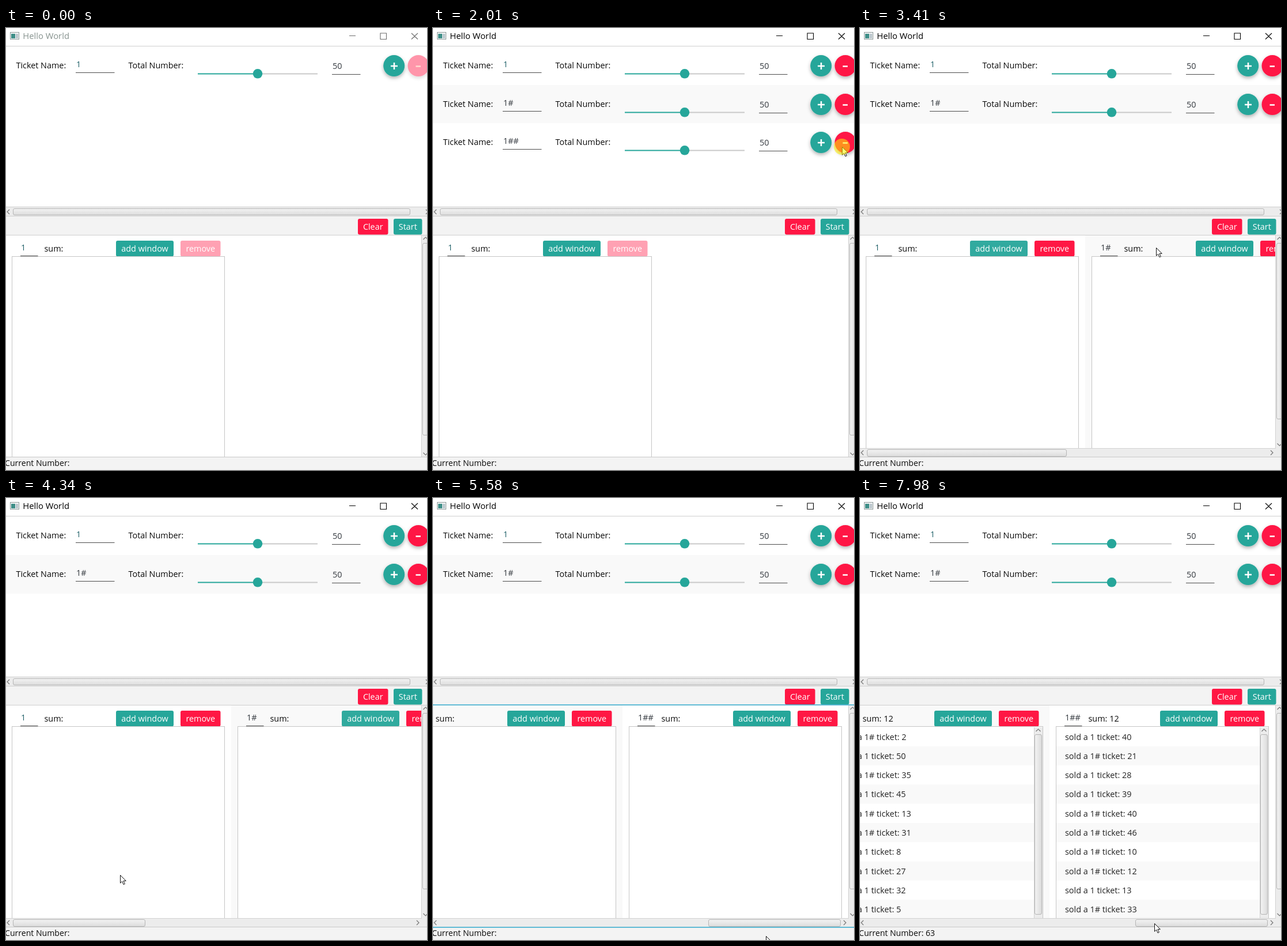
An HTML page for the animation above (8000 ms loop, 731 by 767 pixels).

```html
<!DOCTYPE html>
<html lang="en">
<head>
<meta charset="utf-8">
<title>Ticket windows</title>
<style>
  html, body { margin: 0; width: 100%; height: 100%; overflow: hidden; background: #fff; }
  svg { display: block; font: 14.4px "Open Sans", "Noto Sans", sans-serif; }
</style>
</head>
<body>
<svg id="stage" width="731" height="767" viewBox="0 0 731 767"></svg>
<script>
const LOOP = 8000, STEP = 77.5;
const TEAL = '#26a69a', RED = '#ff1744', INK = '#0a0a0a', FIELD = '#34393f';
const PANEL = 392, MAX_SCROLL = 454, GRAB_X = 99, TRACK = 466;

// Pointer path: time, x, y
const PATH = [
  [70, 567, 314], [300, 640, 50], [450, 668, 62], [1300, 668, 62],
  [1860, 710, 206], [2240, 710, 206], [2900, 228, 398], [3030, 240, 388],
  [3180, 240, 388], [3410, 514, 381], [3720, 631, 387], [4030, 631, 387],
  [4340, 198, 654], [4570, 87, 742], [4720, 99, 740], [5192, 342, 752],
  [5500, 565, 756], [5580, 578, 760], [5960, 578, 760], [6510, 691, 341],
  [6820, 691, 341], [7430, 511, 738], [8000, 511, 738]
];
const PRESSES = [[620, 700], [1160, 1240], [2010, 2080], [3100, 3180],
  [3800, 3950], [4720, 5580], [6660, 6800]];

// Ticket kind and number sold, per window
const SALES = {
  1: ['1# 2', '1 50', '1# 35', '1 45', '1# 13', '1# 31', '1 8', '1 27', '1 32', '1 5'],
  2: ['1 40', '1# 21', '1 28', '1 39', '1# 40', '1# 46', '1# 10', '1# 12', '1 13', '1# 33']
};

const stage = document.getElementById('stage');
const between = (t, a, b) => t >= a && t < b;
const rect = (x, y, w, h, fill, extra = '') =>
  `<rect x="${x}" y="${y}" width="${w}" height="${h}" fill="${fill}" ${extra}/>`;
const path = (d, stroke, width = 1, fill = 'none') =>
  `<path d="${d}" fill="${fill}" stroke="${stroke}" stroke-width="${width}"/>`;
const text = (x, y, s, fill = INK, extra = '') =>
  `<text x="${x}" y="${y}" fill="${fill}" ${extra}>${s}</text>`;
const circle = (x, y, r, fill, extra = '') =>
  `<circle cx="${x}" cy="${y}" r="${r}" fill="${fill}" ${extra}/>`;
const group = (x, y, body) => `<g transform="translate(${x} ${y})">${body}</g>`;
const ticketName = i => '1' + '#'.repeat(i);

const DEFS = `<defs>
  <filter id="shadow" x="-50%" y="-50%" width="200%" height="200%">
    <feDropShadow dx="0" dy="3" stdDeviation="3" flood-opacity=".3"/></filter>
  <linearGradient id="across" x2="1" y2="0"><stop stop-color="#f3f3f3"/><stop offset="1" stop-color="#dcdcdc"/></linearGradient>
  <linearGradient id="down" x2="0" y2="1"><stop stop-color="#f3f3f3"/><stop offset="1" stop-color="#dcdcdc"/></linearGradient>
</defs>`;

function tangent(i, axis) {
  const a = PATH[i - 1], p = PATH[i], b = PATH[i + 1];
  if (!a || !b) return 0;
  const still = q => q[1] === p[1] && q[2] === p[2];
  return still(a) || still(b) ? 0 : (b[axis] - a[axis]) / (b[0] - a[0]);
}

function pointerAt(t) {
  let i = 0;
  while (i < PATH.length - 2 && t >= PATH[i + 1][0]) i++;
  const p = PATH[i], q = PATH[i + 1], span = q[0] - p[0], u = (t - p[0]) / span;
  return [1, 2].map(axis => {
    const ease = u * u * (3 - 2 * u);
    return p[axis] + (q[axis] - p[axis]) * ease
      + span * u * (1 - u) * ((1 - u) * tangent(i, axis) - u * tangent(i + 1, axis));
  });
}

function button(x, y, w, label, fill, opacity = 1) {
  return `<g opacity="${opacity}">` + rect(x, y, w, 27.6, fill, 'rx="3"')
    + text(x + w / 2, y + 19, label, '#fff', 'text-anchor="middle"') + '</g>';
}

function arrow(x, y, angle) {
  return `<path transform="translate(${x} ${y}) rotate(${angle})" d="M-4 2L0 -2L4 2" fill="none" stroke="#777" stroke-width="1.2"/>`;
}

function thumb(x, y, w, h) {
  return rect(x + .5, y + .5, w - 1, h - 1, `url(#${w > h ? 'down' : 'across'})`, 'rx="2.5" stroke="#b5b5b5"');
}

function titleBar(active) {
  const ink = active ? '#000' : '#6c6c6c';
  return rect(0, 0, 731, 31, '#fff')
    + rect(7.5, 7.5, 15, 12, '#f4f4f4', 'stroke="#8c9a9a"')
    + rect(9, 10, 7, 8, '#3f8f88') + rect(17, 10, 4, 8, '#b9c6cc')
    + text(29.3, 19.3, 'Hello World', active ? '#000' : '#87938f', 'font-size="14.8"')
    + path('M596 13.5H607M650 9H660.5V19.5H650ZM704 9L715 19.5M715 9L704 19.5', ink, 1.1)
    + path('M0 31.5H731', '#cfcfcf');
}

function ticketRow(i, removable) {
  const body = rect(0, 0, 731, 67, i % 2 ? '#f9f9f9' : '#fff')
    + text(17.5, 38, 'Ticket Name:') + text(212.5, 38, 'Total Number:')
    + text(122, 35.5, ticketName(i), i ? FIELD : '#1f6068')
    + path('M121 45.5H188.5M566 48.5H615.5', '#4c4c4c')
    + text(567, 39, '50', FIELD)
    + path('M437 47.5H541', '#c9c9c9', 2) + path('M333 47.5H437', TEAL, 2)
    + circle(437, 47.3, 8.3, TEAL)
    + circle(673.7, 33.6, 18.5, TEAL, 'filter="url(#shadow)"')
    + path('M668 34H680M674 28V40', '#fff', 2.5)
    + `<g opacity="${removable ? 1 : .45}">` + circle(716, 33.6, 18.5, RED, 'filter="url(#shadow)"')
    + path('M711.5 34.5H720', removable ? '#fff' : '#ffb199', 2.5) + '</g>';
  return group(0, 32 + Math.round(i * 66.5), body);
}

function toolbar(startGlow) {
  return rect(0, 310, 731, 17, '#ececec') + path('M0 310.5H731M0 326.5H731', '#cfcfcf')
    + arrow(4, 319, -90) + arrow(731, 319, 90) + thumb(12, 313, 690, 12)
    + rect(0, 327, 731, 33, '#f3f3f3') + path('M0 359.5H731', '#cfcfcf')
    + button(611, 331, 52.5, 'Clear', RED) + button(673, 331, 49.5, 'Start', TEAL, 1 - .2 * startGlow);
}

function soldRows(i, sold) {
  let out = '';
  (SALES[i] || []).slice(0, sold).forEach((sale, n) => {
    const [kind, number] = sale.split(' '), y = 397.5 + n * 33.3;
    out += rect(11, y, 368, 33.3, n % 2 ? '#f9f9f9' : '#fff')
      + text(26, y + 22, `sold a ${kind} ticket: ${number}`, '#222');
  });
  if (sold >= 12) {
    out += rect(364, 398, 15, 380, '#ececec') + path('M364.5 398V780', '#d2d2d2')
      + arrow(371.5, 403, 0) + thumb(365, 410, 13, 313);
  }
  return out;
}

function panel(i, removable, sold, glow) {
  return rect(-1, 360, PANEL, 420, i % 2 ? '#f9f9f9' : '#fff')
    + text(26, 386, ticketName(i), i ? FIELD : '#1f6068')
    + path('M25 395.5H55.5', '#444')
    + text(66.5, 388, 'sum:' + (sold ? ' ' + sold : ''))
    + button(191, 369, 100, 'add window', TEAL, glow ? .95 : 1)
    + button(303, 369, 69.5, 'remove', RED, removable ? 1 : .4)
    + rect(10.5, 396.5, 369, 400, '#fff') + soldRows(i, sold)
    + rect(10.5, 396.5, 369, 400, 'none', 'stroke="#c6c6c6"');
}

function windows(t, scroll, sold) {
  const count = t < 3180 ? 1 : t < 3950 ? 2 : 3;
  const bottom = count > 1 ? 729 : 745;
  const glows = [between(t, 3030, 3700), between(t, 3720, 4640)];
  let body = rect(0, 360, 722, 385, '#fff');
  for (let i = 0; i < count; i++) {
    body += group(i * PANEL - scroll, 0, panel(i, count > 1, sold[i], glows[i]));
  }
  let out = `<svg width="722" height="${bottom - 360}" y="360" viewBox="0 360 722 ${bottom - 360}">${body}</svg>`
    + rect(721, 360, 10, 385, '#ececec') + path(`M721.5 360V${bottom}`, '#d2d2d2')
    + arrow(728.5, 365, 0) + arrow(728.5, bottom - 6, 180)
    + thumb(723, 373, 12, count > 1 ? 306 : 334);
  if (count > 1) {
    out += rect(0, 729, 731, 16, '#ececec') + path('M0 729.5H722', '#d2d2d2')
      + arrow(4, 737, -90) + arrow(715, 737, 90)
      + thumb(12 + scroll / MAX_SCROLL * TRACK, 731, count === 2 ? 347 : 230, 13);
  }
  return out;
}

function soldAt(t) {
  const base = t < 6890 ? 0 : Math.min(9, 1 + Math.floor((t - 6890) / 60));
  const later = times => base + times.filter(at => t >= at).length;
  const second = later([7750, 7830, 7980]), third = later([7580, 7750, 7980]);
  return [base ? third + 1 : 0, second, third];
}

function pointer(t) {
  if (t < 70) return '';
  const [x, y] = pointerAt(t);
  const pressed = PRESSES.some(([a, b]) => between(t, a, b));
  return group(x, y, path('M.5 .5V14.2L3.7 11.2L6 16.7L8.3 15.7L6 10.4H10.3Z', '#111', 1, '#fff')
    + (pressed ? circle(0, 0, 14, '#fff000', 'opacity=".55"') : ''));
}

function draw(t) {
  const rowCount = t < 700 ? 1 : between(t, 1240, 2085) ? 3 : 2;
  const drag = t < 4720 ? 0 : t >= 5500 ? 1 : (pointerAt(t)[0] - GRAB_X) / TRACK;
  const scroll = MAX_SCROLL * Math.max(0, Math.min(1, drag));
  const sold = soldAt(t), total = sold[0] + sold[1] + sold[2];
  const startGlow = t < 6660 ? 0 : Math.max(0, Math.min(1, (7050 - t) / 200));
  let out = DEFS + rect(0, 0, 731, 767, '#fff') + titleBar(t >= 620);
  for (let i = 0; i < rowCount; i++) out += ticketRow(i, rowCount > 1);
  out += toolbar(startGlow) + windows(t, scroll, sold)
    + rect(0, 745, 731, 22, '#f3f3f3') + path('M0 744.5H731', '#c9c9c9')
    + text(-2, 759.5, 'Current Number:' + (total ? ' ' + (100 - total) : ''), INK, 'font-size="14.1"');
  if (between(t, 4720, 6730)) out += path('M0 359H731M0 745H731', '#39b0d2', 1.6);
  stage.innerHTML = out + pointer(t);
}

let shown = -1;
function tick(now) {
  const step = Math.floor((now % LOOP + 6) / STEP);
  if (step !== shown) draw((shown = step) * STEP);
  requestAnimationFrame(tick);
}
draw(0);
requestAnimationFrame(tick);
</script>
</body>
</html>
```
